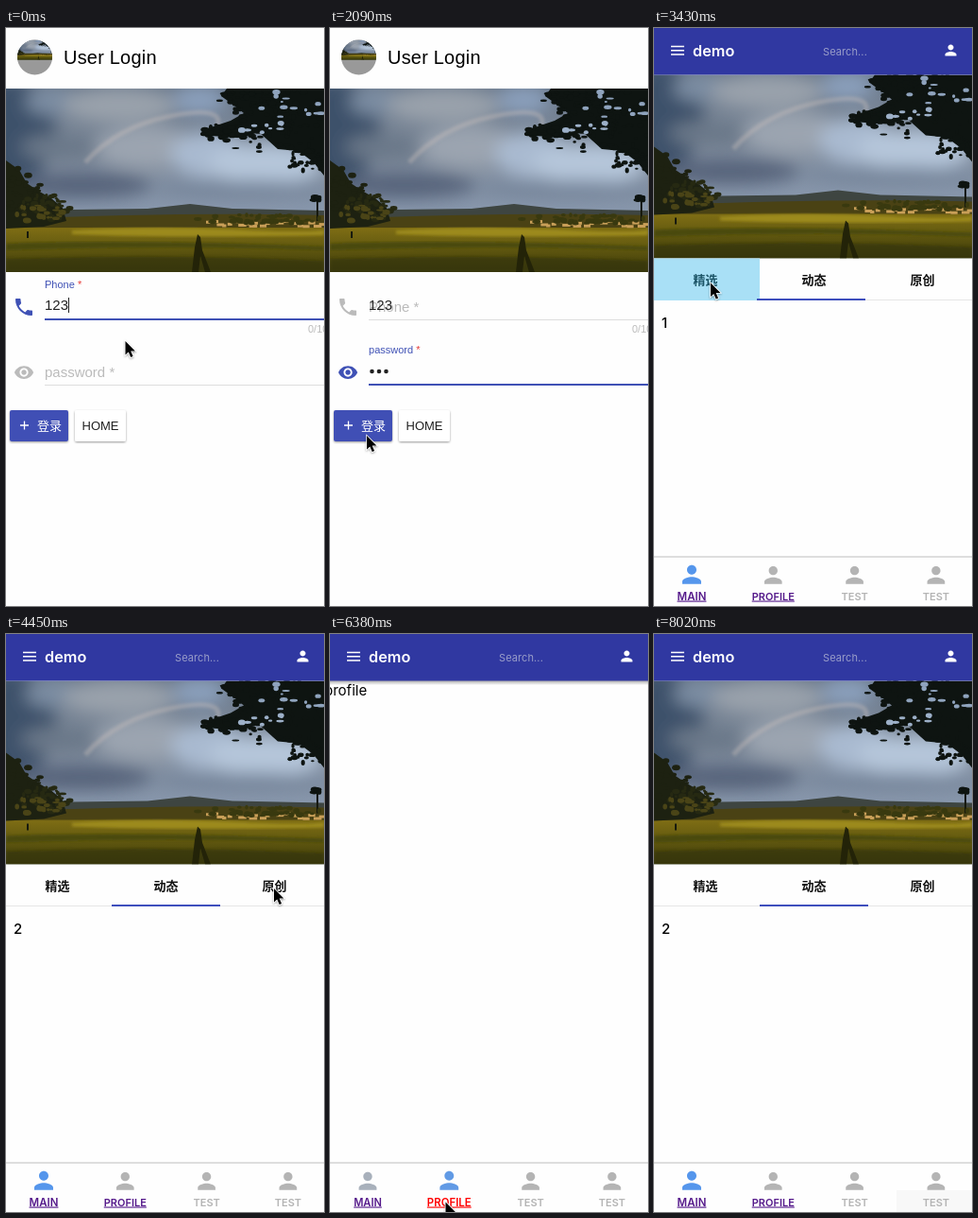
These frames come from a looping animation (337x611 px, 8.12 s). An HTML page:

```html
<!DOCTYPE html>
<html lang="zh-CN">
<head>
<meta charset="utf-8">
<title>Login demo</title>
<style>
  html, body { margin: 0; width: 100%; height: 100%; overflow: hidden; background: #fefefe; }
  svg { display: block; }
  text { font-family: "Liberation Sans", Arial, sans-serif; white-space: pre; }
  .ui { font-family: Inter, Roboto, sans-serif; }
  .cjk { font: 500 13px "Noto Sans CJK SC", "Noto Sans CJK", sans-serif; }
  .mid { text-anchor: middle; }
  #tabs text { font-weight: 700; }
  .nav text { font-weight: 600; font-size: 11px; text-anchor: middle; }
  .link { text-decoration: underline; }
</style>
</head>
<body>
<svg id="stage" width="337" height="611" viewBox="0 0 337 611">
  <defs>
    <linearGradient id="sky" x2="0" y2="1">
      <stop offset="0" stop-color="#6c7a8c"/>
      <stop offset=".35" stop-color="#7f8b9b"/>
      <stop offset=".65" stop-color="#8796ab"/>
    </linearGradient>
    <linearGradient id="grass" x2="0" y2="1">
      <stop offset="0" stop-color="#4f4412"/>
      <stop offset=".22" stop-color="#7d6c14"/>
      <stop offset=".5" stop-color="#665c10"/>
      <stop offset="1" stop-color="#3c3a0a"/>
    </linearGradient>
    <linearGradient id="drop" x2="0" y2="1">
      <stop offset="0" stop-opacity=".35"/>
      <stop offset="1" stop-opacity="0"/>
    </linearGradient>
    <filter id="soft" x="-50%" y="-50%" width="200%" height="200%"><feGaussianBlur stdDeviation="9"/></filter>
    <filter id="haze"><feGaussianBlur stdDeviation="1.5"/></filter>
    <filter id="lift" x="-20%" y="-20%" width="140%" height="150%">
      <feDropShadow dx="0" dy="1" stdDeviation="1" flood-opacity=".4"/>
    </filter>
    <clipPath id="round"><circle cx="30.5" cy="31" r="18.5"/></clipPath>
    <path id="person" d="M12 12c2.21 0 4-1.79 4-4s-1.79-4-4-4-4 1.79-4 4 1.79 4 4 4zm0 2c-2.67 0-8 1.34-8 4v2h16v-2c0-2.66-5.33-4-8-4z"/>
    <symbol id="photo" viewBox="0 0 337 194">
      <rect width="337" height="194" fill="url(#sky)"/>
      <g filter="url(#soft)">
        <ellipse cx="5" cy="45" rx="48" ry="55" fill="#3c516b"/>
        <ellipse cx="50" cy="14" rx="30" ry="14" fill="#7c8da3"/>
        <ellipse cx="120" cy="18" rx="60" ry="18" fill="#9aa2ac"/>
        <ellipse cx="60" cy="62" rx="45" ry="14" fill="#6b7889"/>
        <ellipse cx="150" cy="62" rx="55" ry="22" fill="#9ba4b0"/>
        <ellipse cx="205" cy="12" rx="28" ry="14" fill="#8ba0bd"/>
        <ellipse cx="80" cy="102" rx="75" ry="14" fill="#56647a"/>
        <ellipse cx="215" cy="70" rx="40" ry="24" fill="#a9bad0"/>
        <ellipse cx="275" cy="80" rx="60" ry="22" fill="#b5c6da"/>
        <ellipse cx="250" cy="106" rx="95" ry="9" fill="#75849a"/>
      </g>
      <path d="M84 78Q118 40 175 29T224 40" fill="none" stroke="#cbbfbc" stroke-opacity=".35" stroke-width="5" filter="url(#haze)"/>
      <path d="M0 130L70 128 150 127 195 122 240 127 337 129V148H0z" fill="#3e4541"/>
      <rect y="136" width="337" height="58" fill="url(#grass)"/>
      <path d="M0 138Q200 130 337 134V147H0z" fill="#4a4214"/>
      <path d="M70 150Q150 145 240 149T337 149V155Q180 158 70 154z" fill="#9c8a1b" filter="url(#haze)"/>
      <path d="M0 164Q120 159 337 167V171Q180 165 0 171z" fill="#49480d" filter="url(#haze)"/>
      <path d="M0 180Q170 174 337 182V194H0z" fill="#353608" opacity=".7" filter="url(#haze)"/>
      <g id="town" fill="#c99f58"/>
      <path d="M203 154l3 3 2 14 9 23h-6l-5-17-2 17h-7l3-26z" fill="#232308"/>
      <path d="M23 158V151M330 116V140" stroke="#171a0e" stroke-width="2"/>
      <g id="trees">
        <path d="M0 76L14 86 22 100 34 108 48 116 60 126 64 140 40 146 0 148z" fill="#1d2111"/>
        <path d="M337 0H234L228 8 242 18 252 26 238 34 214 42 216 50 250 52 268 46 288 64 310 66 326 78 337 92z" fill="#0e1411"/>
      </g>
    </symbol>
  </defs>

  <rect width="337" height="611" fill="#fefefe"/>

  <g id="login">
    <circle cx="30.5" cy="31" r="18.5" fill="#999"/>
    <g clip-path="url(#round)"><use href="#photo" x="12" y="12.5" width="37" height="21.3"/></g>
    <text x="61" y="38" font-size="20" letter-spacing=".2">User Login</text>
    <use href="#photo" y="64" width="337" height="194"/>

    <path id="phoneIcon" transform="translate(7 283)" d="M6.62 10.79c1.44 2.83 3.76 5.14 6.59 6.59l2.2-2.2c.27-.27.67-.36 1.02-.24 1.12.37 2.33.57 3.57.57.55 0 1 .45 1 1V20c0 .55-.45 1-1 1-9.39 0-17-7.61-17-17 0-.55.45-1 1-1h3.5c.55 0 1 .45 1 1 0 1.25.2 2.45.57 3.57.11.35.03.74-.25 1.02l-2.2 2.2z"/>
    <text id="phoneLabel" font-size="15">Phone <tspan>*</tspan></text>
    <text x="41" y="298" font-size="15" fill="#222">123</text>
    <rect id="phoneCaret" x="66" y="285" width="1" height="16" fill="#222"/>
    <path d="M41 308.5H337" stroke="#ddd"/>
    <rect id="phoneLine" y="307" height="2" fill="#3f51b5"/>
    <text x="320" y="322" font-size="11" fill="#bbb">0/10</text>

    <path id="eyeIcon" transform="translate(8 353) scale(.92)" d="M12 4.5C7 4.5 2.73 7.61 1 12c1.73 4.39 6 7.5 11 7.5s9.27-3.11 11-7.5c-1.73-4.39-6-7.5-11-7.5zM12 17c-2.76 0-5-2.24-5-5s2.24-5 5-5 5 2.24 5 5-2.24 5-5 5zm0-8c-1.66 0-3 1.34-3 3s1.34 3 3 3 3-1.34 3-3-1.34-3-3-3z"/>
    <text id="passLabel" font-size="15">password <tspan>*</tspan></text>
    <g id="dots" fill="#222">
      <circle cx="44.5" cy="363" r="2.3"/><circle cx="52" cy="363" r="2.3"/><circle cx="59.5" cy="363" r="2.3"/>
    </g>
    <rect id="passCaret" y="354" width="1" height="16" fill="#222"/>
    <path d="M41 377.5H337" stroke="#ddd"/>
    <rect id="passLine" y="376" height="2" fill="#3f51b5"/>

    <g filter="url(#lift)">
      <rect x="4" y="404" width="62" height="33" rx="2" fill="#3f4fb5"/>
      <rect x="73" y="404" width="54" height="33" rx="2" fill="#fff"/>
    </g>
    <path d="M15 420H24M19.5 415.5V424.5" stroke="#fff" stroke-width="1.3"/>
    <text class="cjk" x="33" y="425" fill="#fff">登录</text>
    <text class="mid" x="100" y="425" font-size="13" fill="#222">HOME</text>
  </g>

  <g id="app">
    <g id="main">
      <use href="#photo" y="49.5" width="337" height="194"/>
      <path d="M0 287.5H337" stroke="#e6e6e6"/>
      <rect id="tap" y="243.5" height="44.5" fill="#a9e0f6"/>
      <g class="mid" id="tabs">
        <text class="cjk" x="54.5" y="271">精选</text>
        <text class="cjk" x="169.5" y="271">动态</text>
        <text class="cjk" x="284.5" y="271">原创</text>
      </g>
      <rect id="bar" y="286" width="115" height="2" fill="#3f4fbd"/>
      <text class="ui" id="body" x="8" y="317" font-size="15" font-weight="500"></text>
    </g>
    <g id="profile">
      <rect y="49" width="337" height="5" fill="url(#drop)"/>
      <text class="ui" id="profileText" y="65" font-size="15">profile</text>
    </g>
    <rect width="337" height="49.5" fill="#3038a1"/>
    <path d="M18 19.5H32M18 23.8H32M18 28.1H32" stroke="#fff" stroke-width="1.5"/>
    <text class="ui" x="41" y="30" font-size="16.3" font-weight="600" fill="#fff">demo</text>
    <text class="ui" x="179" y="28.6" font-size="11" letter-spacing=".1" fill="#999dc9">Search...</text>
    <use href="#person" transform="translate(305.5 14.6) scale(.75)" fill="#fff"/>
    <rect y="558" width="337" height="2" fill="#dedede"/>
    <rect id="veil" x="257" y="588" width="80" height="23" fill="#f7f7f7"/>
    <g class="nav" id="nav"></g>
  </g>

  <path id="cursor" d="M0 0V14.5L3.3 11.4 5.7 17 8.1 16 5.7 10.4H10.4Z" stroke="#fff" stroke-width="1.4" paint-order="stroke" filter="url(#lift)"/>
</svg>
<script>
const LOOP = 8120;
const BLUE = [63, 81, 181], GREY = [187, 187, 187], RED = [229, 57, 53];
const ACTIVE = [85, 150, 236], IDLE = [180, 180, 180];

// Each step lists only what changes: [ms, state].
const steps = [
  [0, { page: 'login', focus: 0, dots: 0, caret: 1, cur: [126.5, 331], tab: 2, bar: 112, tap: 0, nav: 0, hot: -1, x: 0, veil: 0 }],
  [150, { cur: [104, 359] }],
  [450, { focus: .35 }],
  [600, { focus: .9 }],
  [750, { focus: 1 }],
  [1050, { dots: 1 }],
  [1190, { dots: 2 }],
  [1640, { dots: 3, caret: 0 }],
  [1790, { cur: [92, 405] }],
  [1940, { cur: [56, 447] }],
  [2090, { cur: [39, 431] }],
  [2540, { page: 'main' }],
  [2830, { cur: [45, 380] }],
  [2980, { cur: [56, 300] }],
  [3130, { cur: [60, 269.5] }],
  [3430, { tab: 1, tap: 1, bar: 109 }],
  [3580, { tap: 0, bar: 32 }],
  [3720, { bar: -3, cur: [105, 271] }],
  [3870, { cur: [169, 270] }],
  [4160, { tab: 2, tap: 2, bar: 0 }],
  [4310, { tap: 0, bar: 77 }],
  [4450, { bar: 112, cur: [284, 269] }],
  [4750, { tab: 3, tap: 3, bar: 115 }],
  [4900, { tap: 0, bar: 192 }],
  [5050, { bar: 227 }],
  [5190, { cur: [262, 320] }],
  [5340, { cur: [190, 430] }],
  [5490, { cur: [100, 545] }],
  [5630, { cur: [46, 600] }],
  [5930, { cur: [122.5, 600.5] }],
  [6380, { page: 'profile', nav: .87, hot: 1, x: -6 }],
  [6530, { nav: 1, hot: -1, x: 0 }],
  [6680, { cur: [84, 601] }],
  [6830, { cur: [45, 600] }],
  [7130, { page: 'main', tab: 2, bar: 112, nav: .13, hot: 0 }],
  [7280, { nav: 0, hot: -1 }],
  [7430, { cur: [44, 606] }],
  [7580, { cur: [44, 640] }],
  [7870, { veil: 1 }],
  [8020, { veil: .8 }]
];
let acc = {};
const states = steps.map(([at, change]) => ({ ...(acc = { ...acc, ...change }), at }));

const $ = id => document.getElementById(id);
const lerp = (a, b, k) => a + (b - a) * k;
const mix = (a, b, k) => `rgb(${a.map((v, i) => Math.round(lerp(v, b[i], k)))})`;
const show = (id, on) => $(id).setAttribute('display', on ? 'inline' : 'none');
function set(el, attrs) {
  for (const k in attrs) el.setAttribute(k, attrs[k]);
  return el;
}
function add(parent, tag, attrs) {
  const el = document.createElementNS('http://www.w3.org/2000/svg', tag);
  parent.append(el);
  return set(el, attrs);
}

let seed = 7;
const rnd = () => (seed = seed * 16807 % 2147483647) / 2147483647;
function leaves(cx, cy, rx, ry, n, fill = '#0e1411') {
  for (let i = 0; i < n; i++) {
    const a = rnd() * 6.28, r = Math.sqrt(rnd());
    add($('trees'), 'ellipse', {
      cx: cx + rx * r * Math.cos(a), cy: cy + ry * r * Math.sin(a),
      rx: 1.5 + rnd() * 3, ry: 1 + rnd() * 2, fill
    });
  }
}
leaves(290, 40, 60, 42, 110);
leaves(258, 12, 34, 14, 40);
leaves(232, 46, 24, 9, 40);
leaves(318, 76, 24, 13, 30);
leaves(300, 22, 38, 20, 14, '#8fa3bd');
leaves(272, 40, 26, 8, 8, '#9db0c8');
leaves(330, 117, 6, 3, 8);
leaves(14, 108, 24, 26, 40, '#1d2111');
leaves(42, 126, 26, 14, 40, '#262912');
leaves(34, 132, 28, 10, 24, '#4a4417');
leaves(270, 138, 68, 5, 50, '#39390f');
for (let i = 0; i < 22; i++) {
  add($('town'), 'rect', { x: 212 + i * 5.7, y: 138 + rnd() * 7, width: 3 + rnd() * 6, height: 3 });
}

const items = ['MAIN', 'PROFILE', 'TEST', 'TEST'].map((name, i) => {
  const cx = 40 + i * 86.3;
  const icon = add($('nav'), 'use', { href: '#person' });
  const label = add($('nav'), 'text', { x: cx, y: 604.5, class: i < 2 ? 'ui link' : 'ui' });
  label.textContent = name;
  return { cx, icon, label };
});

function field(name, y, on) {
  const label = $(name + 'Label');
  set(label, {
    transform: `translate(41 ${lerp(y, y - 25, on)}) scale(${lerp(1, .735, on)})`,
    fill: mix(GREY, BLUE, on)
  });
  set(label.firstElementChild, { fill: mix(GREY, RED, on) });
  set($(name + 'Line'), { x: 41 + 148 * (1 - on), width: 296 * on });
}

function drawLogin(s) {
  field('phone', 300, 1 - s.focus);
  field('pass', 369, s.focus);
  set($('phoneIcon'), { fill: mix(BLUE, GREY, s.focus) });
  set($('eyeIcon'), { fill: mix(GREY, BLUE, s.focus) });
  [...$('dots').children].forEach((d, i) => set(d, { opacity: +(i < s.dots) }));
  show('phoneCaret', s.caret && s.focus === 0);
  show('passCaret', s.caret && s.focus > 0);
  set($('passCaret'), { x: 41 + 7.5 * s.dots });
}

function drawApp(s) {
  show('main', s.page === 'main');
  show('profile', s.page === 'profile');
  set($('profileText'), { x: s.x });
  $('body').textContent = s.tab;
  set($('bar'), { x: s.bar });
  show('tap', s.tap);
  set($('tap'), { x: 115 * s.tap - 118, width: 115 });
  [...$('tabs').children].forEach((t, i) => set(t, { fill: i + 1 === s.tap ? '#1d5568' : '#111' }));
  items.forEach(({ cx, icon, label }, i) => {
    const on = [1 - s.nav, s.nav, 0, 0][i];
    const k = lerp(28, 30, on) / 24;
    set(icon, { transform: `translate(${cx - 12 * k} ${587.7 - 20 * k}) scale(${k})`, fill: mix(IDLE, ACTIVE, on) });
    set(label, { fill: i === s.hot ? '#f00' : i < 2 ? '#551a8b' : '#b4b4b4' });
    label.style.fontSize = lerp(11, 11.5, on) + 'px';
  });
  set($('veil'), { opacity: s.veil });
}

function draw(s) {
  show('login', s.page === 'login');
  show('app', s.page !== 'login');
  drawLogin(s);
  drawApp(s);
  set($('cursor'), { transform: `translate(${s.cur})` });
}

const start = performance.now();
let last;
function tick() {
  const t = (performance.now() - start) % LOOP;
  const s = states.findLast(v => v.at <= t);
  if (s !== last) draw(last = s);
  requestAnimationFrame(tick);
}
tick();
</script>
</body>
</html>
```
